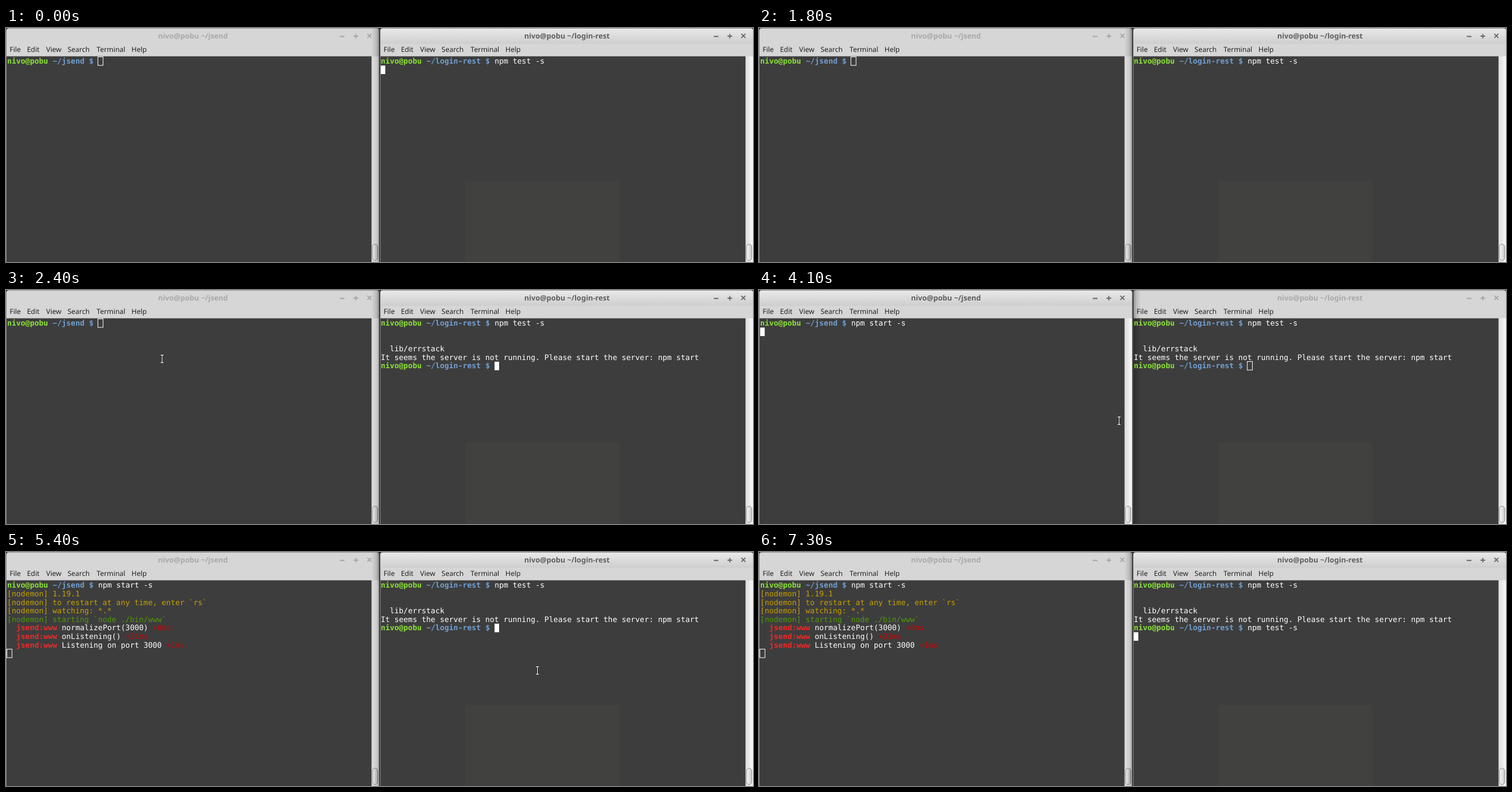
These frames come from a looping animation (1280 px wide and 401 px high, 8000 ms). An HTML page:

```html
<!DOCTYPE html>
<html lang="en">
<head>
<meta charset="utf-8">
<title>Two terminals</title>
<style>
  html, body { margin: 0; width: 100%; height: 100%; overflow: hidden; background: #222; }
  svg { display: block; width: 100%; height: 100%; }
  text { white-space: pre; text-rendering: geometricPrecision; }
  .term { font: 12.956px "DejaVu Sans Mono", monospace; }
  .title { font: bold 12.6px "Noto Sans", sans-serif; text-anchor: middle; }
  .menu { font: 12px "Noto Sans", sans-serif; fill: #222; }
  .bold { font-weight: bold; }
</style>
</head>
<body>
<svg id="stage" viewBox="0 0 1280 401">
  <defs>
    <linearGradient id="bar" x2="0" y2="1">
      <stop stop-color="#e9e9e9"/><stop offset="1" stop-color="#cecece"/>
    </linearGradient>
    <linearGradient id="track">
      <stop stop-color="#dcdcdc"/><stop offset="1" stop-color="#f8f8f8"/>
    </linearGradient>
    <linearGradient id="thumb">
      <stop stop-color="#fafafa"/><stop offset="1" stop-color="#c8c8c8"/>
    </linearGradient>
    <linearGradient id="shade">
      <stop stop-color="#000" stop-opacity="0"/>
      <stop offset=".6" stop-color="#000" stop-opacity=".14"/>
      <stop offset="1" stop-color="#000" stop-opacity=".4"/>
    </linearGradient>
  </defs>
</svg>
<script>
const LOOP = 8000;
const CELL_W = 7.8, CELL_H = 14.625, TOP = 49.725;
const ORIGIN = [1.95, 642.15];
const WHITE = '#fff', LIME = '#8ae234', BLUE = '#729fcf';
const GOLD = '#c4a000', GREEN = '#4e9a06', RED = '#ef2929', DARK_RED = '#cc0000';
const USER = 'nivo@pobu';
const DIRS = ['~/jsend', '~/login-rest'];
const MENU = [['File', 6.2], ['Edit', 35.9], ['View', 68.7], ['Search', 105.5], ['Terminal', 155.3], ['Help', 215]];

const stage = document.getElementById('stage');
const timed = [];

function add(parent, tag, attrs, label) {
  const el = document.createElementNS('http://www.w3.org/2000/svg', tag);
  for (const key in attrs) el.setAttribute(key, attrs[key]);
  if (label) el.textContent = label;
  parent.append(el);
  return el;
}

const show = (el, on) => { el.style.display = on ? '' : 'none'; };
const during = (el, from, to = LOOP) => timed.push({ el, from, to });

function buildWindow(x, w, side) {
  const g = add(stage, 'g', { transform: `translate(${x} 0)` });
  add(g, 'path', { d: `M0 401V5Q0 0 5 0H${w - 5}Q${w} 0 ${w} 5V401Z`, fill: '#8c8c8c' });
  add(g, 'path', { d: `M1 49V5Q1 1 5 1H${w - 5}Q${w - 1} 1 ${w - 1} 5V49Z`, fill: '#d6d6d6' });
  const bar = add(g, 'path', { d: `M1 27V5Q1 1 5 1H${w - 5}Q${w - 1} 1 ${w - 1} 5V27Z`, fill: 'url(#bar)' });
  const title = add(g, 'text', { class: 'title', x: 320.4, y: 18 }, `${USER} ${DIRS[side]}`);
  const buttons = add(g, 'path', {
    d: 'M572 14.5h8M595.5 14h8M599.5 10v8M619.2 9.8l7 7M626.2 9.8l-7 7',
    'stroke-width': 1.8, fill: 'none'
  });
  for (const [label, left] of MENU) add(g, 'text', { class: 'menu', x: left, y: 41 }, label);
  add(g, 'rect', { x: 1, y: 48.5, width: 625.5, height: 353, fill: '#3d3d3d' });
  add(g, 'rect', { x: 626.5, y: 48.5, width: w - 627.5, height: 353, fill: 'url(#track)' });
  add(g, 'rect', { x: 628, y: 370.5, width: 9, height: 28, rx: 4.5, fill: 'url(#thumb)', stroke: '#8b8b8b' });
  return on => {
    show(bar, on);
    title.setAttribute('fill', on ? '#5f5f5f' : '#a9a9a9');
    buttons.setAttribute('stroke', on ? '#686868' : '#a6a6a6');
  };
}

// Shadow that the focused window casts over its neighbour, with a dark seam
function buildShadow(transform) {
  const g = add(stage, 'g', { transform });
  add(g, 'rect', { x: -14, y: 1, width: 14, height: 400, fill: 'url(#shade)' });
  add(g, 'rect', { x: -1.6, y: 0, width: 1.9, height: 401, fill: '#424242' });
  return g;
}

function print(side, row, col, str, color, from = 0, bold = false) {
  const el = add(stage, 'text', {
    class: bold ? 'term bold' : 'term', fill: color,
    x: ORIGIN[side] + col * CELL_W, y: TOP + row * CELL_H + 11.6
  }, str);
  during(el, from);
}

function prompt(side, row, from) {
  print(side, row, 0, USER, LIME, from, true);
  print(side, row, 10, DIRS[side] + ' $', BLUE, from, true);
}

function caret(side, row, col, hollow, from, to) {
  const x = ORIGIN[side] + col * CELL_W, y = TOP + row * CELL_H;
  const el = hollow
    ? add(stage, 'rect', { x: x - .5, y: y - .3, width: CELL_W + 1, height: CELL_H, fill: 'none', stroke: WHITE })
    : add(stage, 'rect', { x, y, width: CELL_W, height: CELL_H, fill: WHITE });
  during(el, from, to);
}

const focusLeft = buildWindow(0, 640, 0);
const focusRight = buildWindow(640.8, 640.2, 1);
const shadeLeft = buildShadow('translate(640.6 0)');
const shadeRight = buildShadow('translate(640.3 0) scale(-1 1)');
add(stage, 'rect', { x: 787, y: 262, width: 264, height: 264, fill: '#41423f' });

// Left terminal
prompt(0, 0, 0);
print(0, 0, 20, 'npm start -s', WHITE, 4100);
['1.19.1', 'to restart at any time, enter `rs`', 'watching: *.*', 'starting `node ./bin/www`']
  .forEach((msg, i) => print(0, i + 1, 0, '[nodemon] ' + msg, i < 3 ? GOLD : GREEN, 5000));
[['normalizePort(3000)', '+0ms'], ['onListening()', '+31ms'], ['Listening on port 3000', '+1ms']]
  .forEach(([msg, delay], i) => {
    print(0, i + 5, 2, 'jsend:www', RED, 5400, true);
    print(0, i + 5, 12, msg, WHITE, 5400);
    print(0, i + 5, 13 + msg.length, delay, DARK_RED, 5400);
  });

// Right terminal
prompt(1, 0, 0);
print(1, 0, 25, 'npm test -s', WHITE);
print(1, 3, 2, 'lib/errstack', WHITE, 1900);
print(1, 4, 0, 'It seems the server is not running. Please start the server: npm start', WHITE, 1900);
prompt(1, 5, 1900);
print(1, 5, 25, 'npm test -s', WHITE, 5700);

// side, row, column, hollow, from, to
[
  [0, 0, 20, true, 0, 4100],
  [0, 1, 0, false, 4100, 4300],
  [0, 5, 0, false, 5000, 5400],
  [0, 8, 0, true, 5400, LOOP],
  [1, 1, 0, false, 0, 600],
  [1, 1, 0, false, 1200, 1800],
  [1, 5, 25, false, 1900, 4100],
  [1, 5, 25, true, 4100, 5400],
  [1, 5, 25, false, 5400, 5700],
  [1, 5, 36, false, 5700, 6300],
  [1, 6, 0, false, 6300, 6600],
  [1, 6, 0, false, 7300, LOOP]
].forEach(c => caret(...c));

// Mouse pointer: an arrow over the window bars, a beam over the text
const mouse = add(stage, 'g', {});
const beam = add(mouse, 'g', { fill: 'none' });
for (const [stroke, width] of [['#000', 3], [WHITE, 1.3]])
  add(beam, 'path', { d: 'M-2.5 -6.5H2.5M0 -6.5V6.5M-2.5 6.5H2.5', stroke, 'stroke-width': width });
const arrow = add(mouse, 'path', {
  d: 'M0 -7V7L3.2 4L5.4 9L7.6 8L5.4 3.2H9.8Z', fill: WHITE, stroke: '#000'
});

function mouseAt(t) {
  if (t < 2000 || t >= 5700) return null;
  if (t < 4100) {
    const p = Math.min(1, Math.floor((t - 2000) / 100) / 4);
    const e = p * p * (3 - 2 * p);
    return [640 - 372.5 * e, 22 + 96 * e];
  }
  return t < 4300 ? [617, 224] : t < 4600 ? [897, 210] : [910.6, 203];
}

function draw(t) {
  for (const { el, from, to } of timed) show(el, t >= from && t < to);
  const leftOn = t >= 4100 && t < 5400;
  focusLeft(leftOn);
  focusRight(!leftOn);
  show(shadeLeft, !leftOn);
  show(shadeRight, leftOn);
  const at = mouseAt(t);
  show(mouse, at);
  if (!at) return;
  mouse.setAttribute('transform', `translate(${at})`);
  show(arrow, at[1] < 49);
  show(beam, at[1] >= 49);
}

const start = performance.now();
function tick(now) {
  draw(Math.max(0, now - start) % LOOP);
  requestAnimationFrame(tick);
}
draw(0);
requestAnimationFrame(tick);
</script>
</body>
</html>
```
